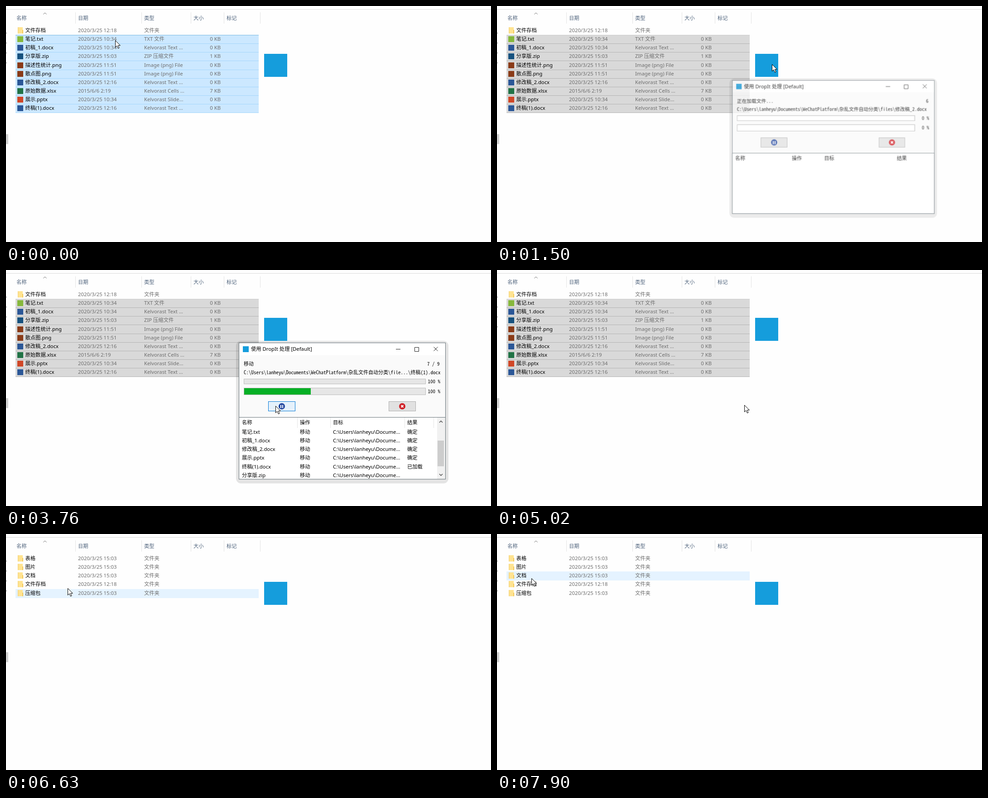
Recreate the animation shown at these times as an HTML page. Size 1071 by 523 pixels, loop 8 s.

```html
<!DOCTYPE html>
<html lang="zh-CN">
<head>
<meta charset="utf-8">
<title>文件自动分类</title>
<style>
  html, body { margin: 0; width: 100%; height: 100%; overflow: hidden; background: #fefefe; }
  svg { display: block; }
  rect { shape-rendering: crispEdges; }
  text { font: 11.3px "Noto Sans", "Noto Sans CJK SC", "Noto Sans CJK", sans-serif; white-space: pre; }
  .mono { font: 11px "Noto Sans Mono CJK SC", "Noto Sans CJK SC", "Noto Sans CJK", monospace; }
  .soft rect { shape-rendering: auto; }
  #dialog { transform-origin: 742.5px 312.5px; }
</style>
</head>
<body>
<svg id="stage" width="1071" height="523" viewBox="0 0 1071 523"></svg>
<script>
const LOOP = 8000, ROW = 19.15;
const GREY = '#6d6d6d', HEAD = '#4c607a', BLUE = '#159ddc';
const HOME = 'C:\\Users\\lanheyu\\Docume';

// Drawing helpers
const fill = (x, y, w, h, color, extra = '') =>
  `<rect x="${x}" y="${y}" width="${w}" height="${h}" fill="${color}" ${extra}/>`;
const box = (x, y, w, h, color, line) =>
  fill(x, y, w, h, line) + fill(x + 1, y + 1, w - 2, h - 2, color);
const stroke = (d, color, width = 1) =>
  `<path d="${d}" fill="none" stroke="${color}" stroke-width="${width}"/>`;
const label = (x, middle, text, color = '#000', extra = '') =>
  `<text x="${x}" y="${middle + 4}" fill="${color}" ${extra}>${text}</text>`;
const mono = (x, middle, text, end) =>
  label(x, middle, text, '#000', `class="mono"${end ? ' text-anchor="end"' : ''}`);
const group = (id, body) => `<g id="${id}">${body}</g>`;
const each = (list, draw) => list.map(draw).join('');

// Explorer
const tint = { txt: '#86b83c', docx: '#2b5797', zip: '#17527f', png: '#8a3b18', xlsx: '#217346', pptx: '#d04727' };
const kinds = {
  txt: 'TXT 文件', docx: 'Kelvorast Text ...', zip: 'ZIP 压缩文件',
  png: 'Image (png) File', xlsx: 'Kelvorast Cells ...', pptx: 'Kelvorast Slide...'
};
const files = [
  ['笔记.txt', '2020/3/25 10:34', 0], ['初稿_1.docx', '2020/3/25 10:34', 0],
  ['分享版.zip', '2020/3/25 15:03', 1], ['描述性统计.png', '2020/3/25 11:51', 0],
  ['散点图.png', '2020/3/25 11:51', 0], ['修改稿_2.docx', '2020/3/25 12:16', 0],
  ['原始数据.xlsx', '2015/6/6 2:19', 7], ['展示.pptx', '2020/3/25 10:34', 0],
  ['终稿(1).docx', '2020/3/25 12:16', 0]
];
const rowMiddle = i => Math.round(54 + ROW * i);

function entry(i, name, date, kind) {
  const y = rowMiddle(i);
  return label(42.5, y, name) + label(159, y, date, GREY) + label(305, y, kind, GREY);
}
function folder(i, name, date = '2020/3/25 15:03') {
  const y = rowMiddle(i);
  return fill(26, y - 7, 11, 14, '#ffe391') + fill(36, y - 1, 2, 8, '#f3c95a') +
    fill(26, y - 7, 1, 14, '#f0cd6c') + entry(i, name, date, '文件夹');
}
function file([name, date, size], i) {
  const ext = name.split('.').pop(), y = rowMiddle(i + 1);
  return fill(25, y - 6, 13, 13, tint[ext]) + entry(i + 1, name, date, kinds[ext]) +
    label(474, y, size + ' KB', GREY, 'text-anchor="end"');
}
const selection = (id, color, line, top) => group(id,
  fill(21, 64, 537, 173, color) +
  each(files, (_, i) => fill(21, Math.round(64 + ROW * i), 537, 1, i ? line : top)) +
  fill(21, 236, 537, 1, line));

const explorer =
  fill(0, 7, 1071, 1, '#dadada') +
  each([59, 81, 103, 125], y => fill(0, y, 2, 2, '#b5b5b5')) +
  group('thumb', fill(0, 284, 5, 22, '#d2d2d2')) +
  each([153, 299, 408, 481, 561], x => fill(x, 14, 1, 25, '#e3e3e3')) +
  each([[23, '名称'], [159, '日期'], [305, '类型'], [414, '大小'], [487, '标记']],
    ([x, text]) => label(x, 27, text, HEAD)) +
  stroke('M82.500 18.500L86 15L89.500 18.500', '#707070') +
  group('before',
    selection('active', '#cce8ff', '#a5d6fb', '#7ab8e0') +
    selection('inactive', '#d9d9d9', '#b4b4b4', '#cccccc') +
    folder(0, '文件存档', '2020/3/25 12:18') + each(files, file)) +
  group('after',
    group('hover', fill(21, 45, 537, 19.500, '#e5f3ff')) +
    folder(0, '表格') + folder(1, '图片') + folder(2, '文档') +
    folder(3, '文件存档', '2020/3/25 12:18') + folder(4, '压缩包')) +
  fill(570, 106, 51, 51, BLUE);

// Dialog
const queue = ['原始数据.xlsx', '描述性统计.png', '散点图.png', '笔记.txt', '初稿_1.docx',
  '修改稿_2.docx', '展示.pptx', '终稿(1).docx', '分享版.zip'];
const LIST = [521, 649, 722, 886];

const path = (name, dir = 'files') =>
  mono(525, 227, `${HOME}nts\\WeChatPlatform\\杂乱文件自动分类\\${dir}\\${name}`);
const status = (id, text, count, percent, body = '') => group(id,
  mono(525, 208, text) + mono(957.5, 208, count, true) +
  mono(959, 247, percent + ' %', true) + mono(959, 269, percent + ' %', true) + body);
const bars = color =>
  box(525, 241, 402, 12, color, '#bcbcbc') + box(525, 261, 402, 16, color, '#bcbcbc');
const progress = width => fill(526, 262, width, 14, '#06b025');

function list(id, first, done, thumbY) {
  const row = (name, i) => {
    const n = first + i, y = Math.round(359 + ROW * i);
    const result = n < done ? '确定' : n === done ? '已加载' : '';
    return each([name, '移动', HOME + '...', result], (s, c) => label(LIST[c], y, s));
  };
  return group(id,
    each([643, 716, 880, 944], x => fill(x, 327, 1, 23, '#e5e5e5')) +
    each(queue.slice(first, first + 6), row) +
    fill(952, 327, 18, 136, '#f1f1f1') + fill(953, thumbY, 14, 57, '#cdcdcd') +
    stroke('M957 338L960.500 334.500L964 338M957 452L960.500 455.500L964 452', '#505050', 1.500));
}
const disc = (x, color) => `<circle cx="${x}" cy="302" r="7" fill="${color}"/>`;

const dialog =
  `<g class="soft">${fill(508, 157, 469, 316, '#000', 'rx="11" opacity=".1"')}</g>` +
  box(514, 161, 457, 303, '#fafafa', '#68747a') +
  fill(515, 162, 455, 27, '#fff') +
  fill(523, 169, 13, 13, BLUE) +
  label(541, 175, '使用 DropIt 处理 [Default]') +
  stroke('M861 175.500h10M902.500 171.500h9v9h-9zM944.500 170.500l9 9M953.500 170.500l-9 9', '#222') +
  bars('#e6e6e6') + group('emptyBars', bars('#fff')) +
  box(579, 291, 60, 22, '#e1e1e1', '#adadad') +
  group('focus', box(579, 291, 60, 22, '#e5f1fb', '#0078d7')) +
  disc(609, '#23479f') +
  group('play', '<path d="M607 298.500L612.500 302L607 305.500Z" fill="#fff"/>') +
  group('pause', fill(606, 299, 2, 7, '#fff') + fill(610, 299, 2, 7, '#fff')) +
  box(845, 291, 60, 22, '#e1e1e1', '#adadad') + disc(875, '#cf2027') +
  stroke('M872.500 299.500l5 5M877.500 299.500l-5 5', '#fff', 2) +
  box(514, 326, 457, 138, '#fff', '#68747a') +
  each(['名称', '操作', '目标', '结果'], (s, i) => label(LIST[i], 338, s)) +
  '<g clip-path="url(#listClip)">' +
  list('listReady', 0, -1, 344) + list('listStart', 0, 0, 344) +
  list('listEarly', 0, 2, 344) + list('listLate', 3, 7, 378) + '</g>' +
  status('load1', '正在加载文件...', '6', 0, path('修改稿_2.docx')) +
  status('load2', '正在加载文件...', '9', 0, path('终稿(1).docx')) +
  status('ready', '准备开始', '9', 0) +
  status('move1', '移动', '0 / 9', 0, path(queue[0], 'file...')) +
  status('move2', '移动', '2 / 9', 100, path(queue[2], 'file...') + progress(50)) +
  status('move3', '移动', '7 / 9', 100, path(queue[7], 'file...') + progress(147));

// Pointer with the items it carries
const tip = group('tip', box(596, 319, 35, 22, '#fff', '#8a8a8a') + label(602, 330, '开始', '#575757'));
const pointer = group('pointer',
  group('carried', '<g opacity=".6">' +
    box(-26, -77, 64, 76, '#f7f7f7', '#b8b8b8') + box(-34, -70, 64, 76, '#fafafa', '#b8b8b8') +
    box(-42, -63, 64, 76, '#fff', '#b0b0b0') + fill(-26, -43, 32, 32, tint.txt) + '</g>' +
    box(-10, -22, 20, 20, '#0078d7', '#fff') + label(-3, -12, '9', '#fff')) +
  '<path d="M.500 .500V15.500L4 12.200L6.500 18L9 17L6.600 11.400H11.300Z" fill="#fff" stroke="#000"/>' +
  group('badge', fill(8.500, 19.500, 10, 8, '#fff', 'stroke="#333" stroke-dasharray="1 1"')));

document.getElementById('stage').innerHTML =
  `<clipPath id="listClip">${fill(515, 327, 455, 136, '#000')}</clipPath>` +
  explorer + group('dialog', dialog) + tip + pointer;

// Motion: every step holds until the next one
function track(id, steps) {
  const frames = steps.map(([ms, style]) => ({ offset: ms / LOOP, easing: 'step-end', ...style }));
  frames.push({ ...frames[frames.length - 1], offset: 1 });
  document.getElementById(id).animate(frames, { duration: LOOP, iterations: Infinity });
}
function show(id, from, to = LOOP) {
  const steps = from ? [[0, { opacity: 0 }]] : [];
  steps.push([from, { opacity: 1 }]);
  if (to < LOOP) steps.push([to, { opacity: 0 }]);
  track(id, steps);
}
const move = (x, y) => ({ transform: `translate(${x}px, ${y}px)` });
const fade = (opacity, scale) => ({ opacity, transform: `scale(${scale})` });

const spans = {
  active: [0, 1500], inactive: [1500, 6120], before: [0, 6120], after: [6120],
  carried: [370, 790], badge: [370, 1350], emptyBars: [1500, 1620],
  load1: [1500, 1620], load2: [1620, 1770], ready: [1770, 3490],
  move1: [3490, 3610], move2: [3610, 3760], move3: [3760, 4000],
  listReady: [1770, 3490], listStart: [3490, 3610], listEarly: [3610, 3760], listLate: [3760, 4000],
  play: [1770, 3490], focus: [2520, 4000]
};
for (const id in spans) show(id, ...spans[id]);

track('pause', [[0, { opacity: 1 }], [1770, { opacity: 0 }], [3490, { opacity: 1 }]]);
track('thumb', [[0, move(0, 0)], [5970, move(0, -22)]]);
track('dialog', [[0, fade(0, 1)], [1500, fade(.75, .978)], [1620, fade(1, 1)],
  [3880, fade(.5, .96)], [4000, fade(0, 1)]]);
track('tip', [[0, { opacity: 0 }], [3030, { opacity: .5 }], [3180, { opacity: 1 }], [3490, { opacity: 0 }]]);
track('hover', [[0, { opacity: 0, ...move(0, 0) }],
  ...[[6630, 4], [6900, 3], [7200, 2], [7500, 1], [7900, 2]]
    .map(([ms, row]) => [ms, { opacity: 1, ...move(0, ROW * row) }])]);
track('pointer', [
  [0, 241, 76], [120, 242, 76], [370, 310, 79], [520, 418, 91], [640, 526, 103],
  [790, 593, 125], [940, 608, 130], [1350, 607, 129], [1770, 650, 190], [1890, 711, 257],
  [2010, 751, 286], [2130, 776, 312], [2280, 690, 311], [2400, 625, 307], [2520, 600, 303],
  [2670, 595, 301], [5020, 546, 299], [5140, 538, 298], [5260, 534, 297], [5970, 530, 299],
  [6120, 490, 306], [6240, 390, 303], [6360, 270, 295], [6480, 175, 281], [6630, 136, 120],
  [6780, 110, 121], [6900, 96, 111], [7050, 96, 103], [7200, 91, 90], [7350, 90, 84],
  [7500, 90, 77], [7750, 81, 82], [7900, 76, 98]
].map(([ms, x, y]) => [ms, move(x, y)]));
</script>
</body>
</html>
```
